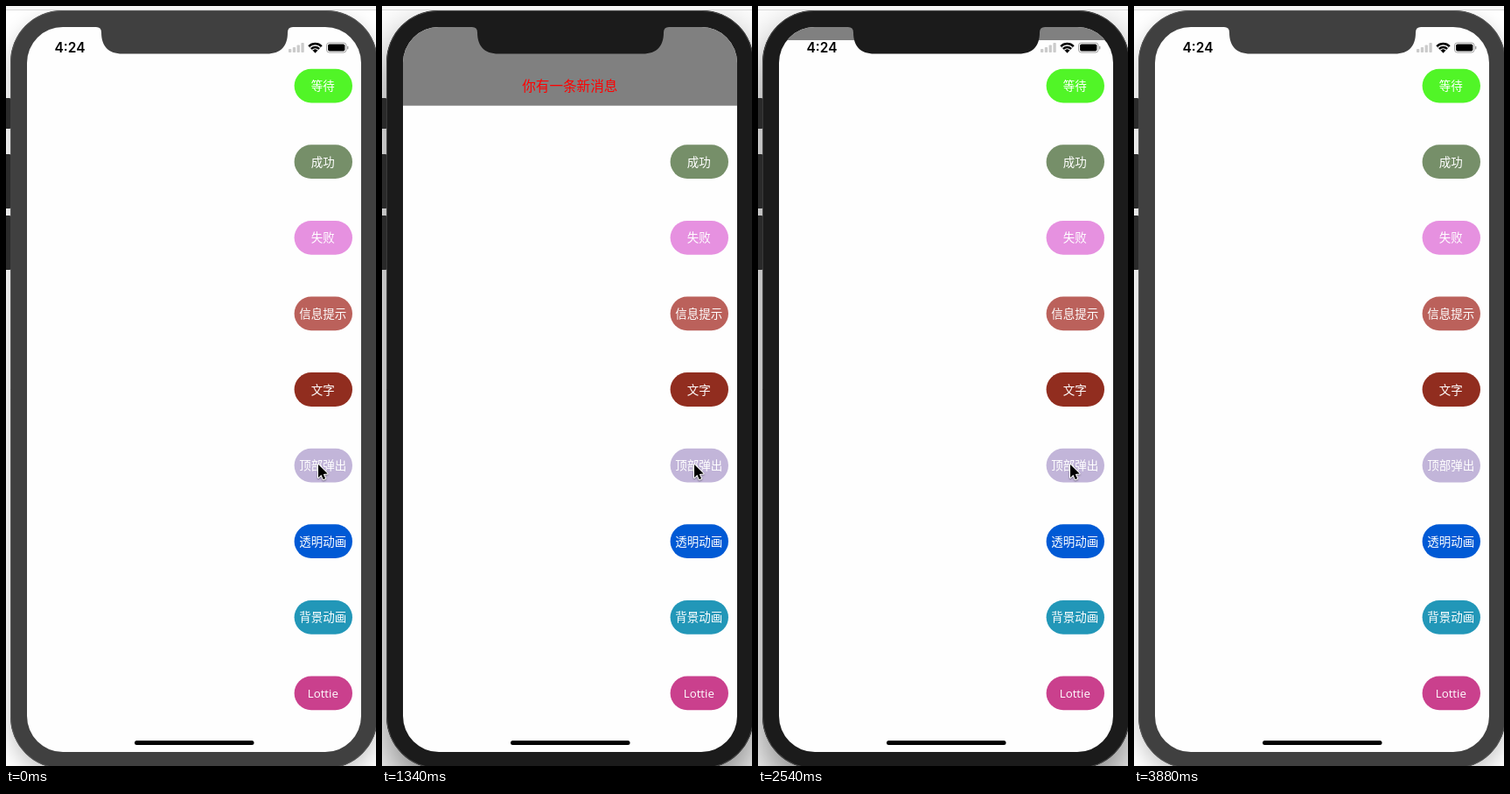
An HTML page with a canvas for the animation above (3.98 s loop, 423 px wide and 867 px high).

```html
<!DOCTYPE html>
<html lang="zh">
<head>
<meta charset="utf-8">
<style>
  html, body { margin: 0; width: 100%; height: 100%; overflow: hidden; background: #fff; }
  canvas { display: block; width: 423px; height: 867px; }
</style>
</head>
<body>
<canvas id="stage"></canvas>
<script>
const W = 423, H = 867, LOOP = 3980;
const SANS = '"Noto Sans CJK SC", "Noto Sans CJK", sans-serif';
const canvas = document.getElementById('stage');
const dpr = window.devicePixelRatio || 1;
canvas.width = W * dpr;
canvas.height = H * dpr;
const ctx = canvas.getContext('2d');

const BUTTONS = [
  ['等待', '#51f527'], ['成功', '#768f69'], ['失败', '#e691e0'],
  ['信息提示', '#bb615b'], ['文字', '#912d1f'], ['顶部弹出', '#c2b5d9'],
  ['透明动画', '#005ad5'], ['背景动画', '#2297b8'], ['Lottie', '#ca408d']
];
const PRESSED = 5;

// [start time, value]; each value holds until the next start
const FOCUS = [[0, false], [900, true], [3880, false]];
const PRESS = [[0, false], [900, true], [1040, false]];
const BANNER = [[0, 0], [1040, 47], [1190, 105.5], [1340, 113.7], [2390, 105], [2540, 39], [2690, 0]];
const POINTER = [[0, [357, 523]], [2830, [366, 519.5]], [2980, null], [3430, [418.5, 860]], [3580, null]];

const at = (track, t) => track.filter(k => k[0] <= t).pop()[1];

function round(x, y, w, h, r, fill) {
  ctx.beginPath();
  ctx.roundRect(x, y, w, h, r);
  if (fill) {
    ctx.fillStyle = fill;
    ctx.fill();
  }
}

function label(str, x, y, size, color, font = SANS, weight = 400) {
  ctx.font = `${weight} ${size}px ${font}`;
  ctx.textAlign = 'center';
  ctx.textBaseline = 'alphabetic';
  ctx.fillStyle = color;
  ctx.fillText(str, x, y);
}

function drawWindow(active) {
  ctx.fillStyle = '#fff';
  ctx.fillRect(0, 0, W, H);
  ctx.save();
  ctx.beginPath();
  ctx.rect(0, 5, W, H);
  ctx.clip();

  ctx.save();
  ctx.shadowColor = `rgba(0,0,0,${active ? 0.5 : 0.22})`;
  ctx.shadowBlur = (active ? 50 : 24) * dpr;
  ctx.shadowOffsetY = (active ? 24 : 10) * dpr;
  const body = active ? '#1b1b1b' : '#404040';
  round(5, 5, 420, 865, 59, body);
  ctx.restore();

  ctx.strokeStyle = active ? '#4a4a4a' : '#585858';
  ctx.lineWidth = 1;
  round(5.5, 5.5, 419, 864, 58.5);
  ctx.stroke();

  for (const [y, h] of [[105, 35], [169, 62], [239, 62]]) {
    round(-3, y, 8.5, h, 1.5, '#2a2a2a');
  }
  ctx.restore();

  ctx.fillStyle = '#f5f5f5';
  ctx.fillRect(0, 0, W, 4);
  ctx.fillStyle = '#dadada';
  ctx.fillRect(0, 4, W, 1);
}

function drawNotch(color) {
  ctx.beginPath();
  ctx.moveTo(103, 23);
  ctx.lineTo(103, 24);
  ctx.quadraticCurveTo(109, 24, 109, 30);
  ctx.bezierCurveTo(109, 46, 117, 54.5, 133, 54.5);
  ctx.lineTo(298, 54.5);
  ctx.bezierCurveTo(314, 54.5, 322, 46, 322, 30);
  ctx.quadraticCurveTo(322, 24, 328, 24);
  ctx.lineTo(328, 23);
  ctx.fillStyle = color;
  ctx.fill();
}

function drawWifi(x, y) {
  const fan = (r, color) => {
    ctx.beginPath();
    ctx.moveTo(x, y);
    ctx.arc(x, y, r, -Math.PI * 0.75, -Math.PI * 0.25);
    ctx.closePath();
    ctx.fillStyle = color;
    ctx.fill();
  };
  [[11.6, '#000'], [9.1, '#fff'], [7.6, '#000'], [5.2, '#fff'], [3.8, '#000']].forEach(a => fan(...a));
}

function drawStatus() {
  label('4:24', 73, 53, 15.5, '#000', 'Inter, sans-serif', 600);
  [4, 6, 8.5, 11].forEach((h, i) => round(323 + i * 4.8, 53 - h, 3.3, h, 0.8, '#cbcbcb'));
  drawWifi(353.5, 53.4);
  ctx.strokeStyle = '#a3a3a3';
  ctx.lineWidth = 1;
  round(366.5, 42, 22.5, 11, 3);
  ctx.stroke();
  round(368.1, 43.6, 19.3, 7.8, 1.7, '#000');
  round(390, 45.7, 1.4, 3.8, 0.7, '#a3a3a3');
}

function drawButtons(pressed) {
  BUTTONS.forEach(([name, color], i) => {
    const y = 91.1 + i * 86.6;
    const down = pressed && i === PRESSED;
    round(329.6, y - 19.4, 66.4, 38.8, 19.4, down ? '#676174' : color);
    const latin = name === 'Lottie';
    label(name, 362.3, y + 5, latin ? 13.3 : 13.5, '#fff', latin ? '"Open Sans", sans-serif' : SANS);
  });
}

function drawBanner(bottom) {
  ctx.fillStyle = '#808080';
  ctx.fillRect(24, bottom - 90, 382, 90);
  label('你有一条新消息', 214.8, bottom - 16.8, 15.6, '#f00');
}

function drawPointer([x, y]) {
  ctx.save();
  ctx.translate(x, y);
  ctx.beginPath();
  [[0, 0], [0, 15], [3.4, 11.8], [5.7, 17], [8.1, 16], [5.8, 10.9], [10.6, 10.6]]
    .forEach(p => ctx.lineTo(...p));
  ctx.closePath();
  ctx.lineJoin = 'round';
  ctx.lineWidth = 2;
  ctx.strokeStyle = '#fff';
  ctx.shadowColor = 'rgba(0,0,0,.4)';
  ctx.shadowBlur = 2 * dpr;
  ctx.shadowOffsetY = dpr;
  ctx.stroke();
  ctx.shadowColor = 'transparent';
  ctx.fillStyle = '#000';
  ctx.fill();
  ctx.restore();
}

function draw(t) {
  const active = at(FOCUS, t);
  const bottom = at(BANNER, t);
  const pointer = at(POINTER, t);
  ctx.setTransform(dpr, 0, 0, dpr, 0, 0);
  drawWindow(active);

  ctx.save();
  round(24, 24, 382, 827, 41, '#fefefe');
  ctx.clip();
  drawStatus();
  drawButtons(at(PRESS, t));
  round(147, 838, 136.5, 5, 2.5, '#000');
  if (bottom) drawBanner(bottom);
  ctx.restore();

  drawNotch(active ? '#1b1b1b' : '#404040');
  if (pointer) drawPointer(pointer);
}

const start = performance.now();
function tick() {
  draw((performance.now() - start) % LOOP);
  requestAnimationFrame(tick);
}
tick();
</script>
</body>
</html>
```
